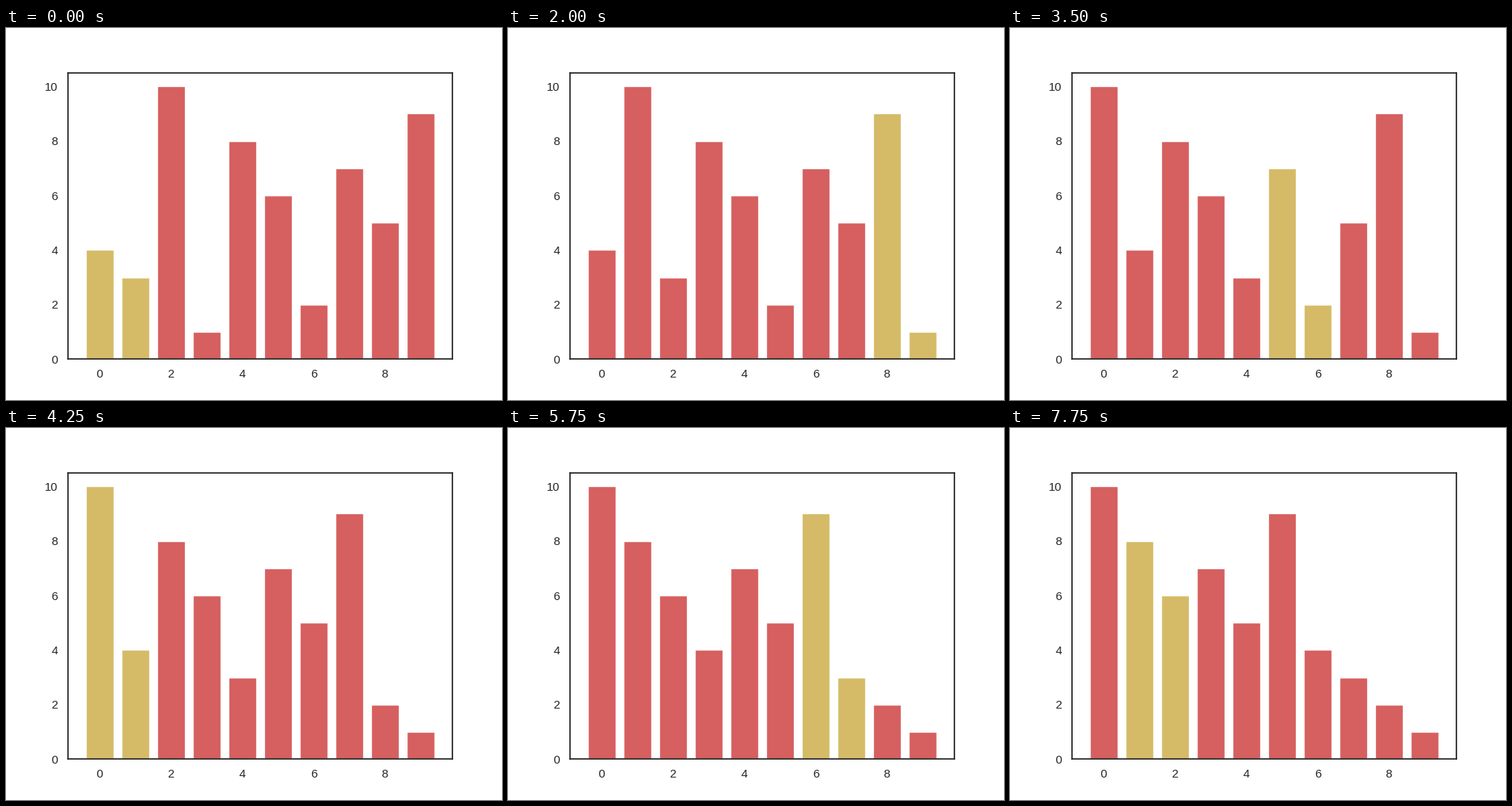
A matplotlib script for the animation above (8 s loop, 640 by 480 pixels).

```python
import matplotlib.pyplot as plt
from matplotlib.animation import FuncAnimation

FRAMES = 32
INTERVAL = 250
START = [4, 3, 10, 1, 8, 6, 2, 7, 5, 9]
RED, YELLOW, INK = "#D65F5F", "#D5BB67", ".15"


def bubble_steps(values):
    """Yield the list and the compared index after each step, largest first."""
    vals = list(values)
    for last in range(len(vals) - 1, 0, -1):
        for i in range(last):
            if vals[i] < vals[i + 1]:
                vals[i], vals[i + 1] = vals[i + 1], vals[i]
            yield list(vals), i


steps = list(bubble_steps(START))

plt.rcParams.update({
    "font.family": "Liberation Sans",
    "axes.linewidth": 1.25,
    "axes.edgecolor": INK,
    "axes.axisbelow": True,
})

fig = plt.figure(figsize=(6.4, 4.8), dpi=100, facecolor="white")
ax = fig.add_axes([0.125, 0.11, 0.775, 0.77])
bars = ax.bar(range(len(START)), START, width=0.8, color=RED,
              edgecolor="white", linewidth=1)
ax.set_xlim(-0.89, 9.89)
ax.set_ylim(0, 10.5)
ax.set_xticks(range(0, 10, 2))
ax.set_yticks(range(0, 11, 2))
ax.tick_params(left=False, bottom=False, length=6, pad=3.5,
               labelsize=11, labelcolor=INK)


def draw(frame):
    heights, current = steps[frame]
    for i, (bar, height) in enumerate(zip(bars, heights)):
        bar.set_height(height)
        bar.set_facecolor(YELLOW if i in (current, current + 1) else RED)
    return list(bars)


anim = FuncAnimation(fig, draw, frames=FRAMES, interval=INTERVAL,
                     init_func=lambda: draw(0), repeat=True, repeat_delay=0)
plt.show()
```
